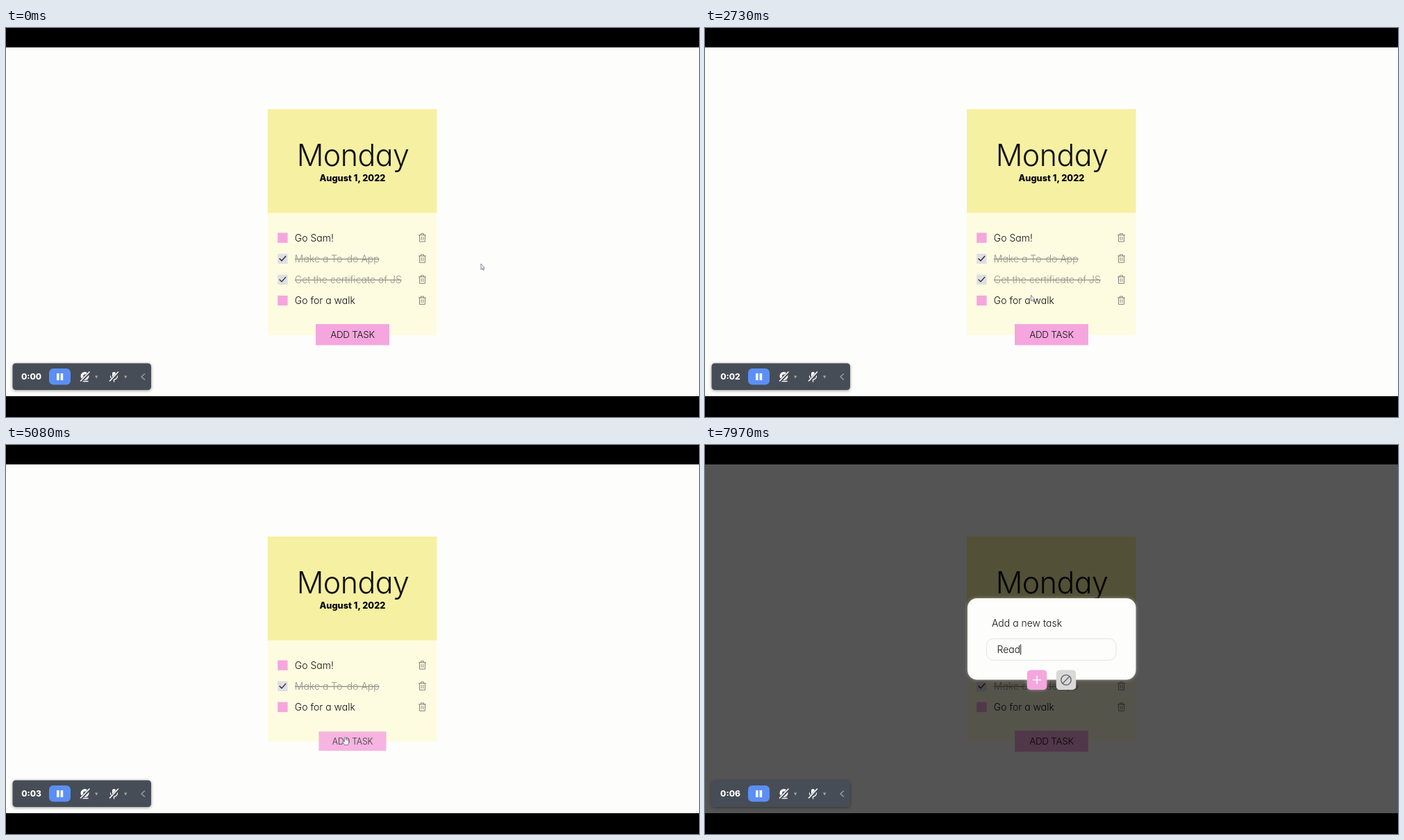
Recreate the animation shown at these times as an HTML page. Size 998x561 px, loop 8000 ms.

```html
<!DOCTYPE html>
<html lang="en">
<head>
<meta charset="utf-8">
<title>To-do list</title>
<style>
  html, body { margin: 0; width: 100%; height: 100%; overflow: hidden; background: #000; }
  svg { display: block; width: 100%; height: 100%; }
  text { font: 300 14px Inter, Lato, sans-serif; font-feature-settings: "cv11"; fill: #111; }
  .day { font-size: 43px; letter-spacing: -0.6px; }
  .date { font-size: 12.8px; font-weight: 800; fill: #000; }
  .mid { text-anchor: middle; }
  .done text { fill: #96958e; text-decoration: line-through; }
  .caps { font-size: 13.5px; letter-spacing: -0.3px; }
  .clock { font-size: 12px; font-weight: 800; fill: #fff; }
  .line { fill: none; stroke-linecap: round; stroke-linejoin: round; }
</style>
</head>
<body>
<svg viewBox="0 0 998 561">
  <defs>
    <filter id="shadow" x="-20%" y="-30%" width="140%" height="170%">
      <feDropShadow dx="0" dy="1" stdDeviation="2" flood-color="#000" flood-opacity=".4"/>
    </filter>
    <filter id="glow" x="-40%" y="-40%" width="180%" height="180%">
      <feDropShadow dx="0" dy="0" stdDeviation="2.5" flood-color="#fff" flood-opacity=".4"/>
    </filter>
    <path id="trash" class="line" stroke="#85847f" d="M-5-4H5M-2-4V-6H2V-4M-4-4V5.5H4V-4M-1.4-1.5V3M1.4-1.5V3"/>
  </defs>

  <rect y="28" width="998" height="503" fill="#fdfdfc"/>

  <g id="card">
    <rect id="sheet" x="377" y="266" width="243.5" fill="#fefce0"/>
    <rect x="377" y="117" width="243.5" height="149.5" fill="#f6f0a2"/>
    <text class="day mid" x="499.5" y="198.5">Monday</text>
    <text class="date mid" x="499" y="220.5">August 1, 2022</text>
    <g id="tasks"></g>
  </g>
  <g id="addButton">
    <rect x="-53" y="-15.2" width="106" height="30.4" fill="#f5a6de"/>
    <text class="caps mid" y="5">ADD TASK</text>
  </g>

  <g id="modal">
    <rect y="28" width="998" height="503" fill="#000" opacity=".665"/>
    <rect x="378" y="221" width="242.5" height="117.5" rx="14" fill="#fdfdfc" filter="url(#glow)"/>
    <text x="413" y="262">Add a new task</text>
    <rect x="405.5" y="279.3" width="186.5" height="31" rx="10" fill="#fdfdfc" stroke="#e3e3de"/>
    <text id="entry" x="420.5" y="300"></text>
    <path id="caret" stroke="#111" d="M0 287.5V302.5"/>
    <rect x="463.8" y="324.5" width="28.5" height="28.5" rx="5" fill="#f5a6de" filter="url(#glow)"/>
    <path class="line" stroke="#fff" stroke-width="1.5" d="M472.5 338.8H483.5M478 333.3V344.3"/>
    <rect x="505.8" y="324.5" width="28.5" height="28.5" rx="5" fill="#d9d9d9"/>
    <path class="line" stroke="#66666a" stroke-width="1.4" d="M512.8 338.8a7.2 7.2 0 1 0 14.4 0a7.2 7.2 0 1 0-14.4 0M515 344L525 333.7"/>
  </g>

  <g id="recorder">
    <rect x="9.5" y="483.5" width="199.5" height="38.5" rx="4.5" fill="#464d57" filter="url(#shadow)"/>
    <text id="clock" class="clock mid" x="36.5" y="507.3"></text>
    <rect x="62" y="491" width="31" height="23.5" rx="6" fill="#5b8ff5"/>
    <path fill="#fff" d="M73 498h3.6v10H73zM78.6 498h3.6v10h-3.6z"/>
    <circle cx="113.5" cy="502" r="6" fill="#fff"/>
    <circle cx="113.5" cy="502" r="2.4" fill="#464d57"/>
    <path class="line" stroke="#fff" stroke-width="1.6" d="M109 509.5H118"/>
    <rect x="153" y="496" width="5" height="9" rx="2.5" fill="#fff"/>
    <path class="line" stroke="#fff" stroke-width="1.3" d="M150.5 502a5 5 0 0 0 10 0M155.5 507V510"/>
    <g class="line">
      <path stroke="#464d57" stroke-width="4" d="M108 509.5L120.5 496.5M150 509.5L162 496.5"/>
      <path stroke="#fff" stroke-width="1.6" d="M107.5 509L120 496M149.5 509L161.5 496"/>
    </g>
    <path fill="#a3a7ac" d="M128 501.5h4.4l-2.2 4zM170 501.5h4.4l-2.2 4z"/>
    <path class="line" stroke="#9a9fa6" stroke-width="1.5" d="M199.5 499L195 503L199.5 507"/>
  </g>

  <g id="pointer" stroke-linejoin="round">
    <path id="arrow" fill="#fff" stroke="#75738f" stroke-width=".9" d="M0 0V8.5L2 6.8L3.2 9.4L4.4 8.8L3.2 6.3H5.3Z"/>
    <path id="hand" fill="#fff" stroke="#55535f" stroke-width=".7" d="M-1 1Q0-1 1 1V4Q2 3.4 2.6 4.5Q3.6 4 4 5Q5.2 4.6 5.2 6V8Q5 10 4 11.5H-1Q-2 9.5-3.7 7Q-3.4 5.6-1 7Z"/>
  </g>
</svg>
<script>
const LOOP = 8000, ROW = 30.15;
const DELETE_AT = 4000, MODAL_AT = 5350;
const HOVER_IN = 4900, HOVER_OUT = 5750;
const TICKS = [1300, 2700, 4200, 5800, 6900, 7900];
const KEYSTROKES = [7150, 7390, 7610, 7820];
const TASKS = [
  ["Go Sam!", false],
  ["Make a To-do App", true],
  ["Get the certificate of JS", true],
  ["Go for a walk", false],
];
const DELETED = 2;
// time, x, y
const POINTER = [
  [0, 684, 340], [300, 684, 340], [1450, 394.5, 398], [2300, 394.5, 398],
  [3350, 599.5, 363], [4150, 599.5, 363], [4980, 488.5, 421],
  [5720, 488.5, 421], [6150, 500, 292],
];
const HAND_TIMES = [[1350, 2380], [3270, DELETE_AT], [HOVER_IN, HOVER_OUT]];

const $ = id => document.getElementById(id);
const show = (el, on) => el.setAttribute("display", on ? "inline" : "none");
const move = (el, x, y, scale = 1) =>
  el.setAttribute("transform", `translate(${x} ${y}) scale(${scale})`);
const clamp = v => Math.min(1, Math.max(0, v));
const smooth = p => p * p * (3 - 2 * p);
const easeOut = p => 1 - (1 - p) ** 2;
const countPast = (times, t) => times.filter(at => t >= at).length;

$("tasks").innerHTML = TASKS.map(([label, done]) => `
  <g class="${done ? "done" : ""}">
    <rect x="391.2" y="-7.2" width="14.4" height="14.4" fill="${done ? "#dfdee4" : "#f5a6de"}"/>
    ${done ? '<path class="line" stroke="#222" stroke-width="1.3" d="M394 0L397 3L402.8-3.5"/>' : ""}
    <text x="415.8" y="5.2">${label}</text>
    <use href="#trash" x="599.5"/>
  </g>`).join("");
const rows = [...$("tasks").children];

function pointerAt(t) {
  const next = POINTER.findIndex(key => key[0] > t);
  if (next < 0) return POINTER.at(-1).slice(1);
  const [t0, x0, y0] = POINTER[next - 1], [t1, x1, y1] = POINTER[next];
  const p = smooth((t - t0) / (t1 - t0));
  return [x0 + (x1 - x0) * p, y0 + (y1 - y0) * p];
}

function drawCard(t) {
  const deleted = t >= DELETE_AT;
  const shift = deleted ? ROW / 2 : 0;
  move($("card"), 0, shift);
  $("sheet").setAttribute("height", deleted ? 177 - ROW : 177);
  rows.forEach((row, i) => {
    show(row, !(deleted && i === DELETED));
    move(row, 0, 302.6 + ROW * (deleted && i > DELETED ? i - 1 : i));
  });
  const hover = easeOut(clamp((t - HOVER_IN) / 300)) - easeOut(clamp((t - HOVER_OUT) / 300));
  move($("addButton"), 499, 442.2 - shift, 1 - 0.1 * hover);
  $("addButton").setAttribute("opacity", 1 - 0.2 * hover);
}

function drawModal(t) {
  show($("modal"), t >= MODAL_AT);
  $("entry").textContent = "Read".slice(0, countPast(KEYSTROKES, t));
  show($("caret"), t >= 6650);
  move($("caret"), 421 + $("entry").getComputedTextLength(), 0);
}

function drawPointer(t) {
  const hand = HAND_TIMES.some(([from, to]) => t >= from && t < to);
  move($("pointer"), ...pointerAt(t));
  show($("pointer"), t < 6150);
  show($("hand"), hand);
  show($("arrow"), !hand);
}

function draw(now) {
  const t = now % LOOP;
  drawCard(t);
  drawModal(t);
  drawPointer(t);
  $("clock").textContent = "0:0" + countPast(TICKS, t);
}

let start;
function frame(now) {
  start ??= now;
  draw(now - start);
  requestAnimationFrame(frame);
}
draw(0);
requestAnimationFrame(frame);
</script>
</body>
</html>
```
